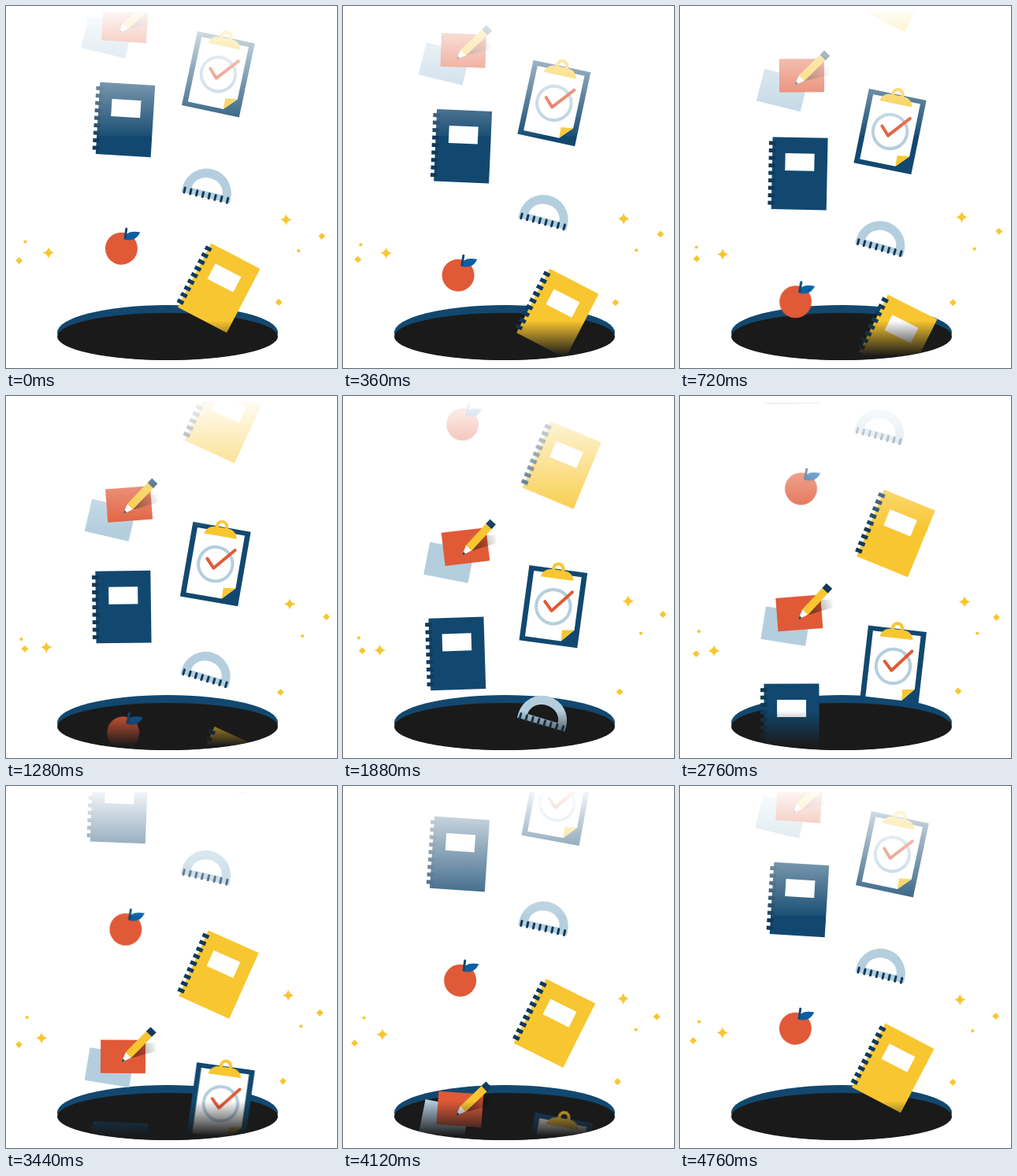
Write an HTML page that moves like this. It is 420 by 460 pixels and loops after 4800 ms.

```html
<!DOCTYPE html>
<html lang="en">
<head>
<meta charset="utf-8">
<title>School supplies falling into a hole</title>
<style>
  html, body { margin: 0; width: 100%; height: 100%; overflow: hidden; background: #fff; }
  svg { display: block; }
  .navy { fill: #12486f; }
  .dark { fill: #113a5a; }
  .pale { fill: #b4cede; }
  .red { fill: #e05a38; }
  .gold { fill: #f8c630; }
  .white { fill: #fff; }
  .line { fill: none; stroke-width: 4; stroke-linecap: round; stroke-linejoin: round; }
</style>
</head>
<body>
<svg width="420" height="460" viewBox="0 0 420 460">
  <defs>
    <linearGradient id="fade" gradientUnits="userSpaceOnUse" x1="0" y1="8" x2="0" y2="445">
      <stop offset="0" stop-color="#fff" stop-opacity=".06"/>
      <stop offset=".36" stop-color="#fff" stop-opacity=".96"/>
      <stop offset=".36" stop-color="#fff"/>
      <stop offset=".897" stop-color="#fff"/>
      <stop offset="1" stop-color="#fff" stop-opacity="0"/>
    </linearGradient>
    <linearGradient id="shade" gradientUnits="userSpaceOnUse" x1="-8" y1="5" x2="18" y2="19">
      <stop offset="0" stop-opacity=".4"/>
      <stop offset="1" stop-opacity="0"/>
    </linearGradient>
    <mask id="view" maskUnits="userSpaceOnUse" x="0" y="0" width="420" height="460">
      <path d="M0 8H420V420H345A140 30 0 0 1 65 420H0Z" fill="url(#fade)"/>
    </mask>
    <g id="label">
      <rect class="white" x="-18.5" y="-25.5" width="37" height="22"/>
      <path d="M-35.2 -40.5V41" fill="none" stroke="#113a5a" stroke-width="8.5" stroke-dasharray="5 4.5"/>
    </g>
    <path id="star" d="M0 -7.3Q1.4 -1.4 7.3 0Q1.4 1.4 0 7.3Q-1.4 1.4 -7.3 0Q-1.4 -1.4 0 -7.3Z"/>
    <path id="diamond" d="M0 -4.4L4.4 0L0 4.4L-4.4 0Z"/>
    <circle id="dot" r="2.1"/>
  </defs>

  <ellipse class="navy" cx="205" cy="415" rx="140" ry="35"/>
  <ellipse cx="205" cy="420" rx="140" ry="30" fill="#1a1a1a"/>

  <g mask="url(#view)">
    <g id="items">
      <g id="blueCard"><rect class="pale" x="-28.7" y="-21" width="57.4" height="42"/></g>
      <g id="redCard"><rect class="red" x="-28.5" y="-21.2" width="57" height="42.4"/></g>
      <g id="pencil">
        <path d="M-22 2L8 3L20 15L11 21Z" fill="url(#shade)"/>
        <path class="white" d="M-29 0L-16 -5V5Z"/>
        <path class="dark" d="M-29 0L-24.5 -1.8V1.8Z"/>
        <path class="gold" d="M-16.2 -5H21V5H-16.2Z"/>
        <path class="dark" d="M21 -5H29V5H21Z"/>
      </g>
      <g id="blueBook">
        <rect class="navy" x="-35" y="-45.8" width="70" height="91.6"/>
        <use href="#label"/>
      </g>
      <g id="clipboard">
        <rect class="navy" x="-37.2" y="-48" width="74.4" height="96"/>
        <path class="white" d="M-30.5 -42H30.5V26L15.5 42H-30.5Z"/>
        <path class="gold" d="M15 28L30.5 26L15.5 42Z"/>
        <circle class="line" r="21.7" stroke="#b4cede"/>
        <path class="line" d="M-11.4 -5L-1.5 5.5L21.5 -21.5" stroke="#e05a38"/>
        <path class="gold" d="M-21 -36C-20 -43 -14 -47 -8 -47H8C14 -47 20 -43 21 -36Z"/>
        <circle cy="-48.5" r="6.2" class="line" stroke="#f8c630"/>
      </g>
      <g id="protractor">
        <path class="pale" fill-rule="evenodd" d="M-31.5 5.5V0A31.5 31.5 0 0 1 31.5 0V5.5ZM-20 -2.5H20A20 17.5 0 0 0 -20 -2.5Z"/>
        <path class="line" d="M-28 -.5v6m8 -6v6m8 -6v6m8 -6v6m8 -6v6m8 -6v6m8 -6v6m8 -6v6" stroke="#113a5a" style="stroke-width:3"/>
      </g>
      <g id="apple">
        <circle class="red" r="20.5"/>
        <path d="M4.5 -11.5C5 -21 13 -22.5 24 -20.5C20 -12 13 -9 4.5 -11.5Z" fill="#0a5fa4"/>
        <path class="line" d="M6.5 -25L4.7 -13" stroke="#12486f" style="stroke-width:3"/>
      </g>
      <g id="yellowBook">
        <rect class="gold" x="-35" y="-45.8" width="70" height="91.6"/>
        <use href="#label"/>
      </g>
    </g>
    <use href="#items" y="-447"/>
  </g>
  <g id="sparkles" class="gold"></g>
</svg>
<script>
const STEP = 40, STEPS = 120;
const DROP = 447;   // distance fallen per loop, also the gap between the two copies
const WRAP = 58;    // topmost centre of the lower copy

// Each value drifts as [mean, cosine part, sine part]
const items = {
  blueCard:   { x: [131.4, -3.4, .6],   y: [36.5, 2.9, 1.45],   r: [11.5, 1.8, 1.85] },
  redCard:    { x: [152.1, -1.25, 3.85], y: [19.7, 4.4, -1.9],  r: [-1.2, 5, -2.5] },
  pencil:     { x: [167.2, -3.55, 1.1], y: [8.8, 5.7, .55],     r: [-45.5, 2.2, -.4] },
  blueBook:   { x: [146.9, 4.57, 2.6],  y: [148.4, -3.9, -1],   r: [1.1, 2.4, -1.6] },
  clipboard:  { x: [269.1, .28, -3.33], y: [87, -.3, 6.35],     r: [9.3, 2.7, .9] },
  protractor: { x: [253.5, .9, -.2],    y: [236.9, 1.2, -.6],   r: [14.6, -1.1, 1.9] },
  apple:      { x: [149.8, -3.4, -1.5], y: [307, 1.15, .7],     r: [1.2, -1.5, 1.5] },
  yellowBook: { x: [273.2, -2.95, 3.75], y: [359.6, -1.2, -3.75], r: [24.8, 2.8, .2] },
};
const sparkles = [
  { shape: 'star',    x: [48.9, 5, 3],         y: [319, -5.4, -.3] },
  { shape: 'dot',     x: [23.2, 1.1, -3.7],    y: [301.3, -1.7, 7.6] },
  { shape: 'diamond', x: [19.7, -3, 3.9],      y: [324.8, -1.2, -3.6] },
  { shape: 'star',    x: [358.6, -3.3, 1],     y: [265.9, 5.6, -1] },
  { shape: 'diamond', x: [402.2, -1.5, 4.2],   y: [285.5, 7.05, -4] },
  { shape: 'dot',     x: [374.7, -3.4, 1.1],   y: [305.9, 5.2, -.3] },
  { shape: 'diamond', x: [349.4, -3.25, -1.5], y: [375.9, .6, .75] },
];

for (const [id, item] of Object.entries(items)) item.node = document.getElementById(id);
for (const s of sparkles) {
  s.node = document.createElementNS('http://www.w3.org/2000/svg', 'use');
  s.node.setAttribute('href', '#' + s.shape);
  document.getElementById('sparkles').append(s.node);
}

const place = (node, x, y, r = 0) =>
  node.setAttribute('transform', `translate(${x} ${y}) rotate(${r})`);

function draw(now) {
  const u = Math.floor(now / STEP) % STEPS / (STEPS - 1);
  const c = Math.cos(2 * Math.PI * u), s = Math.sin(2 * Math.PI * u);
  const drift = ([mean, a, b]) => mean + a * c + b * s;

  for (const { node, x, y, r } of Object.values(items)) {
    const fall = drift(y) + DROP * u - WRAP + DROP;
    place(node, drift(x), fall % DROP + WRAP, drift(r));
  }
  for (const { node, x, y } of sparkles) place(node, drift(x), drift(y));
}

function tick() {
  draw(performance.now());
  requestAnimationFrame(tick);
}
tick();
</script>
</body>
</html>
```
